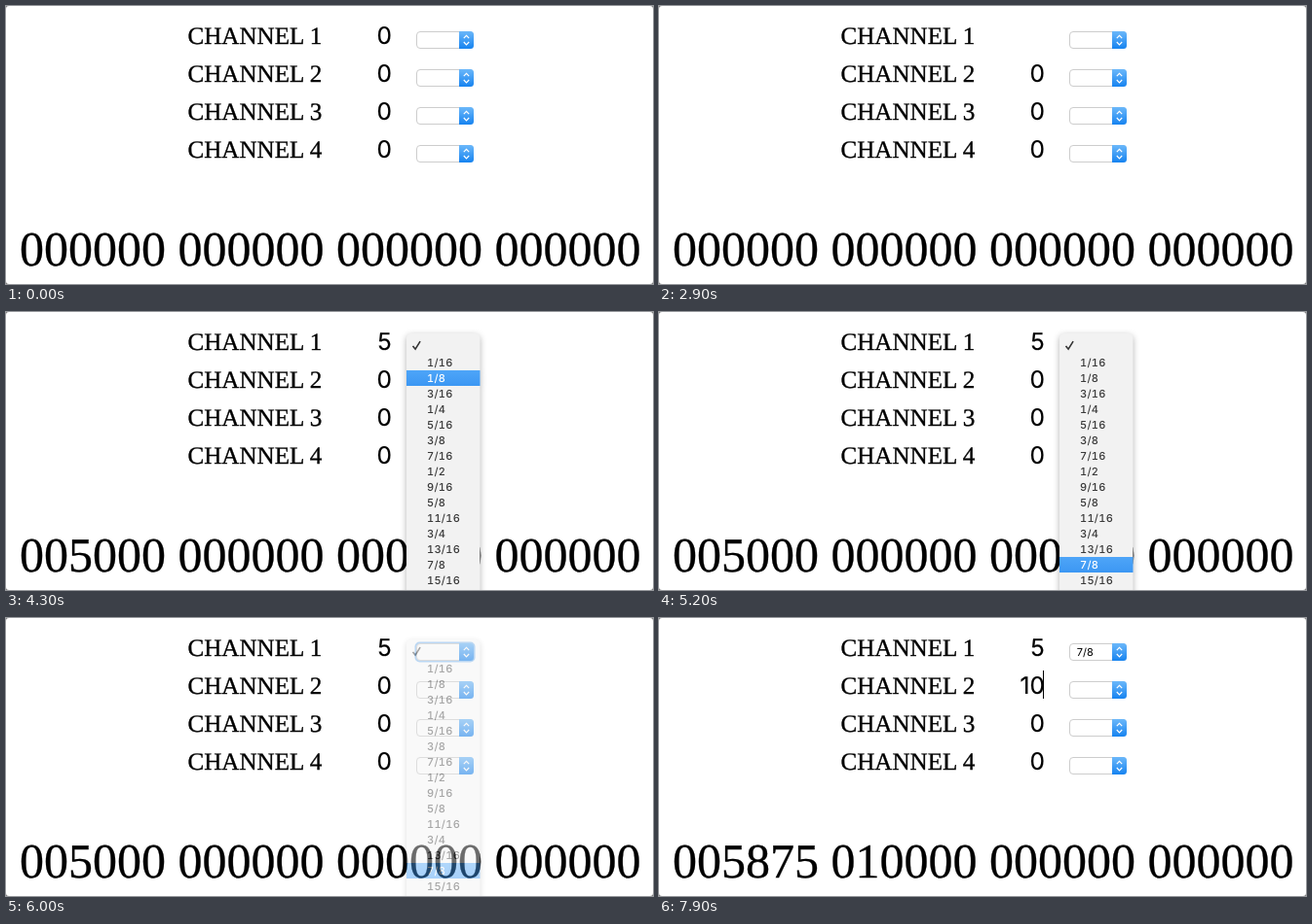
Animation, 664 px wide and 286 px high, one loop 8000 ms. Source, as an HTML page:

```html
<!DOCTYPE html>
<html lang="en">
<head>
<meta charset="utf-8">
<title>Channel counters</title>
<style>
  html, body { margin: 0; width: 100%; height: 100%; overflow: hidden; background: #fff; }
  svg { display: block; width: 100%; height: 100%; text-rendering: geometricPrecision; }
  .label, .total { font-family: "Liberation Serif", "Times New Roman", Times, serif; white-space: pre; stroke: #000; }
  .label { font-size: 25.1px; stroke-width: .35px; }
  .total { font-size: 50px; stroke-width: .3px; }
  .value, .choice, .item { font-family: Inter, "Liberation Sans", sans-serif; font-optical-sizing: none; }
  .value { font-size: 24.4px; text-anchor: end; stroke: #000; stroke-width: .2px; }
  .choice { font-size: 11px; }
  .item { font-size: 11px; font-weight: 450; font-feature-settings: "tnum"; letter-spacing: .3px; }
  #menu { filter: drop-shadow(0 2px 3px rgba(0, 0, 0, .3)); }
</style>
</head>
<body>
<svg id="stage" viewBox="0 0 664 286" preserveAspectRatio="none">
  <defs>
    <linearGradient id="button" x2="0" y2="1">
      <stop stop-color="#6cb8fa"/><stop offset="1" stop-color="#1683f0"/>
    </linearGradient>
    <linearGradient id="hover" x2="0" y2="1">
      <stop stop-color="#4ea5f8"/><stop offset="1" stop-color="#3c97f3"/>
    </linearGradient>
  </defs>
</svg>
<script>
const LOOP = 8000, STEP = 100, ROW = 39, ITEM = 16;
const stage = document.getElementById('stage');

function add(parent, tag, attrs, text = '') {
  const node = document.createElementNS('http://www.w3.org/2000/svg', tag);
  for (const key in attrs) node.setAttribute(key, attrs[key]);
  node.textContent = text;
  return parent.appendChild(node);
}

function set(node, key, value) { node.setAttribute(key, value); }
function show(node, on) { set(node, 'visibility', on ? 'visible' : 'hidden'); }

// Value of the last [time, value] key that has been reached
function at(keys, t) {
  return keys.reduce((value, [time, next]) => t >= time ? next : value, keys[0][1]);
}

function gcd(a, b) { return b ? gcd(b, a % b) : a; }
function fraction(n) {
  const d = gcd(n, 16);
  return `${n / d}/${16 / d}`;
}

const VALUES = [
  [[0, '0'], [2300, ''], [3300, '5']],
  [[0, '0'], [7300, '1'], [7500, '10']]
];
const TOTALS = [
  [[0, 0], [3400, 5000], [6200, 5875]],
  [[0, 0], [7400, 1000], [7600, 10000]]
];
const CARET = [[0, -1], [1100, 0], [1600, -1], [2100, 0], [2800, -1],
               [3300, 0], [3800, -1], [7300, 1]];
// Menu position under the pointer, in sixteenths
const HOVER = [[0, 0], [4300, 2], [4400, 4], [4500, 8], [4600, 10], [4700, 12],
               [5000, 13], [5200, 14], [5300, 15], [5500, 14]];

const ring = add(stage, 'rect', { x: 419.5, y: 24.5, width: 62, height: 21, rx: 5, fill: '#8fc3f5' });
const mark = add(stage, 'rect', { x: 380, y: 54, width: 15, height: 29, fill: '#eecbd0' });

const values = [];
let choice;
for (let i = 0; i < 4; i++) {
  const row = add(stage, 'g', { transform: `translate(0 ${i * ROW})` });
  add(row, 'text', { class: 'label', x: 186.5, y: 39 }, `CHANNEL ${i + 1}`);
  values.push(add(row, 'text', { class: 'value', x: 395.8, y: 39 }, '0'));
  add(row, 'rect', { x: 421.5, y: 26.5, width: 58, height: 17, rx: 3.5, fill: '#fff', stroke: '#cdcdcd' });
  add(row, 'path', { d: 'M465 26H476.5a3.5 3.5 0 0 1 3.5 3.5v11a3.5 3.5 0 0 1 -3.5 3.5H465z', fill: 'url(#button)' });
  add(row, 'path', {
    d: 'M469.8 33.2l2.7-2.8 2.7 2.8M469.8 37l2.7 2.8 2.7-2.8',
    fill: 'none', stroke: '#fff', 'stroke-width': 1.2
  });
  if (i === 0) choice = add(row, 'text', { class: 'choice', x: 428.8, y: 39 });
}
const caret = add(stage, 'rect', { x: 394, width: 1, height: 29 });
const total = add(stage, 'text', { class: 'total', x: 13.9, y: 267.3 });

const menu = add(stage, 'g', { id: 'menu' });
add(menu, 'rect', { x: 411, y: 22, width: 75.5, height: 290, rx: 5, fill: '#f2f2f2' });
const hover = add(menu, 'rect', { x: 411, width: 75.5, height: ITEM, fill: 'url(#hover)' });
const check = add(menu, 'path', { d: 'M417.5 35l2.6 3.2 5-8', fill: 'none', 'stroke-width': 1.6 });
const items = [];
for (let n = 1; n < 16; n++) {
  items[n] = add(menu, 'text', { class: 'item', x: 432, y: 40 + n * ITEM }, fraction(n));
}

// Rounded window corners
add(stage, 'path', {
  d: 'M0 0H3Q0 0 0 3zM664 0V3Q664 0 661 0zM0 286V283Q0 286 3 286zM664 286H661Q664 286 664 283z',
  fill: '#777'
});

function draw(time) {
  const t = Math.floor(time / STEP) * STEP;

  VALUES.forEach((keys, i) => { values[i].textContent = at(keys, t); });
  const sums = [0, 1, 2, 3].map(i => TOTALS[i] ? at(TOTALS[i], t) : 0);
  total.textContent = sums.map(n => String(n).padStart(6, '0')).join(' ');
  choice.textContent = t >= 6200 ? fraction(14) : '';

  const caretRow = at(CARET, t);
  show(caret, caretRow >= 0);
  set(caret, 'y', 15 + Math.max(caretRow, 0) * ROW);
  show(ring, t >= 4000 && t < 6400);
  show(mark, t >= 6700 && t < 7300);

  const fade = Math.min(1, Math.max(0, 1 - (t - 5750) / 450));
  show(menu, t >= 4000 && fade > 0);
  set(menu, 'opacity', fade);
  const active = at(HOVER, t);
  set(hover, 'y', 28 + active * ITEM);
  set(check, 'stroke', active ? '#333' : '#fff');
  items.forEach((item, n) => set(item, 'fill', n === active ? '#fff' : '#3a3a3a'));
}

const start = performance.now();
function tick() {
  draw((performance.now() - start) % LOOP);
  requestAnimationFrame(tick);
}
tick();
</script>
</body>
</html>
```
